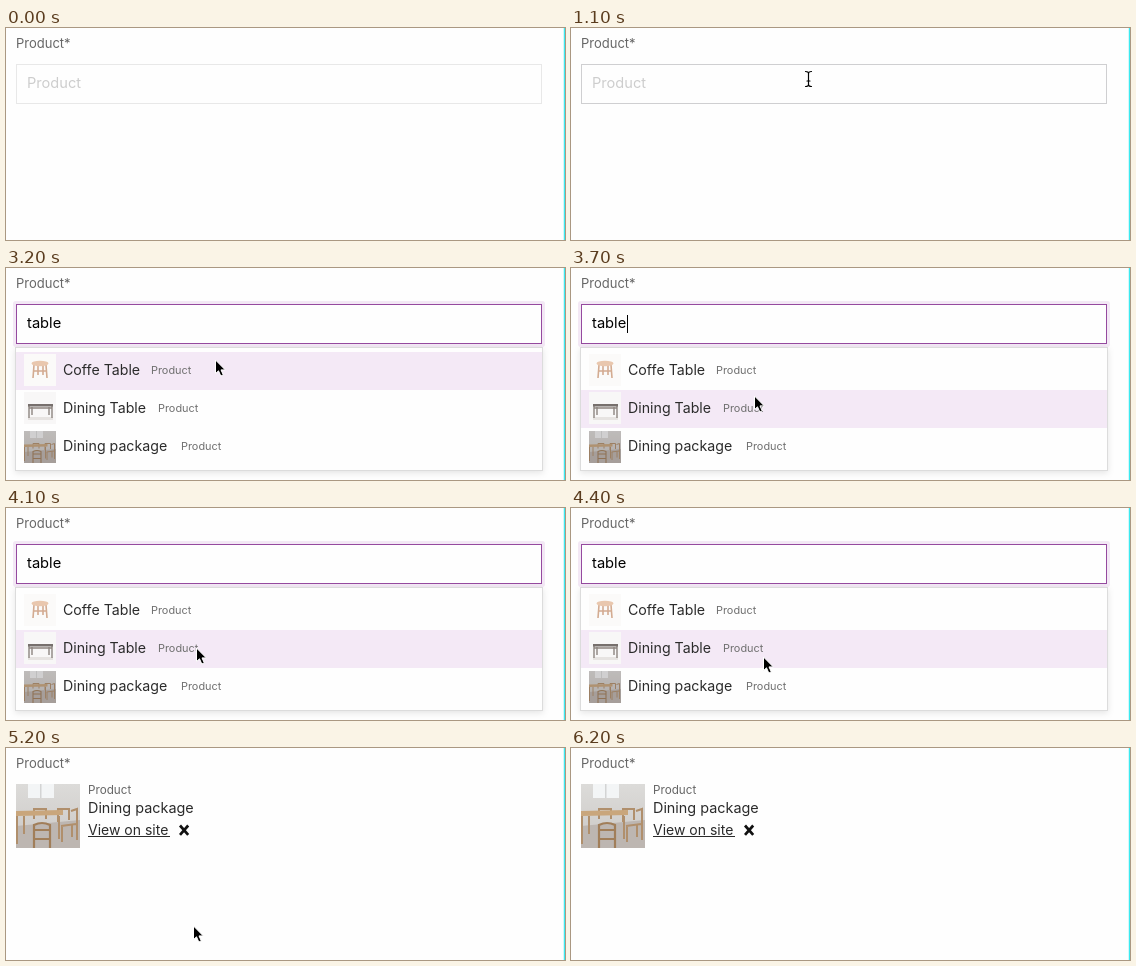
An HTML page for the animation above (7.9 s loop, 559 px wide and 212 px high).

```html
<!DOCTYPE html>
<html lang="en">
<head>
<meta charset="utf-8">
<title>Product chooser</title>
<style>
  html, body { margin: 0; width: 100%; height: 100%; overflow: hidden; background: #fefefe; }
  svg { display: block; }
  text { font: 14.2px Inter, "Open Sans", sans-serif; fill: #2b2b2b; }
  .label { font-size: 13px; fill: #666; }
  .hint { font-size: 14.6px; fill: #cdcdcd; }
  .typed { font-size: 14.7px; fill: #000; }
  .kind { font-size: 10.9px; fill: #707070; }
  .meta { font-size: 11.7px; fill: #666; }
  .name { font-size: 14.4px; }
  .link { font-size: 14px; }
  #panel { fill: #fefefe; stroke: #dcdcdc; filter: drop-shadow(0 2px 3px rgba(0, 0, 0, .1)); }
</style>
</head>
<body>
<svg width="559" height="212" viewBox="0 0 559 212">
  <defs>
    <linearGradient id="wall" x2="0" y2="1">
      <stop offset="0" stop-color="#dcdbd9"/>
      <stop offset="1" stop-color="#cbc8c5"/>
    </linearGradient>
    <symbol id="room" viewBox="0 0 64 64">
      <path fill="url(#wall)" d="M0 0H64V64H0Z"/>
      <path fill="#bdb6b1" d="M0 42L64 36V64H0Z"/>
      <path fill="#f3f5f6" d="M12 0H38V14H12Z"/>
      <path fill="#d3d4d4" d="M24 0H25.5V14H24Z"/>
      <g fill="none" stroke="#b08f6c" stroke-width="2">
        <path d="M18 35V25H30V35M42 38V25H53V36M55 27L61 25V56M45 42L60 40M46 42V58M56 41V53"/>
        <path d="M1 32V60M43 32V55M8 32V50"/>
      </g>
      <path fill="#c9a67c" d="M0 27L47 26V31L0 32Z"/>
      <g fill="none" stroke="#a17e59" stroke-width="2.2">
        <path d="M18 64V41Q26 37 34 41V64M18 46H34M18 55H34"/>
      </g>
    </symbol>
    <symbol id="coffee" viewBox="0 0 32 32">
      <path fill="#fbfaf9" d="M0 0H32V32H0Z"/>
      <path fill="none" stroke="#d3ab91" stroke-width="1.6" d="M10 11L9 24M22 11L23 24M14 11V21M19 11V21M10 17H22"/>
      <ellipse cx="16" cy="9.5" rx="8.5" ry="2.7" fill="#e9c7ae"/>
    </symbol>
    <symbol id="dining" viewBox="0 0 32 32">
      <path fill="#f8f7f7" d="M0 0H32V32H0Z"/>
      <path fill="#e6e3e1" d="M4 25H29V28H4Z"/>
      <path fill="none" stroke="#8d8580" stroke-width="1.4" d="M5 13V26M28 13V26M8 15V23M25 15V23M5 16H28"/>
      <path fill="#77706d" d="M4 12H29V14.5H4Z"/>
    </symbol>
  </defs>

  <path fill="#d2f8fa" d="M557 0h1v212h-1z"/>
  <path fill="#3ceaf0" d="M558 0h1v212h-1z"/>
  <text class="label" x="10" y="20">Product*</text>

  <g id="form">
    <rect id="ring" x="7" y="33" width="532" height="46" rx="3" fill="#f3e8f5"/>
    <rect id="field" x="10.5" y="36.5" width="525" height="39" fill="#fefefe"/>
    <text id="hint" class="hint" x="21" y="60">Product</text>
    <text id="typed" class="typed" x="21" y="60"></text>
    <rect id="caret" y="47" width="1" height="18"/>
    <rect id="panel" x="9.5" y="79.5" width="527"/>
    <g id="list">
      <rect id="mark" x="10" width="526" height="38" fill="#f4e9f6"/>
      <use href="#coffee" x="18" y="86" width="32" height="32"/>
      <text x="57" y="107">Coffe Table</text>
      <text class="kind" x="145" y="106">Product</text>
      <use href="#dining" x="18" y="124" width="32" height="32"/>
      <text x="57" y="145">Dining Table</text>
      <text class="kind" x="152" y="144">Product</text>
      <use href="#room" x="18" y="163" width="32" height="32"/>
      <path fill="#51484a" opacity=".22" d="M18 163h32v32h-32z"/>
      <text x="57" y="183">Dining package</text>
      <text class="kind" x="175" y="182">Product</text>
    </g>
  </g>

  <g id="chosen">
    <use href="#room" x="10" y="36" width="64" height="64"/>
    <text class="meta" x="82" y="46">Product</text>
    <text class="name" x="82" y="65">Dining package</text>
    <text class="link" x="82" y="87">View on site</text>
    <path fill="#2b2b2b" d="M82 88h82v1h-82z"/>
    <path stroke="#111" stroke-width="2.7" d="M174 77.5L182.2 86.8M182.2 77.5L174 86.8"/>
  </g>

  <path id="arrow" stroke="#fff" stroke-width="1" stroke-linejoin="round"
    d="M0 0V13.6L3 10.8L5.3 16L7.8 14.9L5.5 9.9H9.8Z"/>
  <g id="beam" fill="none" stroke-linecap="round">
    <path stroke="#fff" stroke-width="2.6" d="M-3 -7.5Q0 -7.5 0 -5.5Q0 -7.5 3 -7.5M0 -5.5V5.5M-3 7.5Q0 7.5 0 5.5Q0 7.5 3 7.5M-1.5 2H1.5"/>
    <path stroke="#000" stroke-width="1.2" d="M-3 -7.5Q0 -7.5 0 -5.5Q0 -7.5 3 -7.5M0 -5.5V5.5M-3 7.5Q0 7.5 0 5.5Q0 7.5 3 7.5M-1.5 2H1.5"/>
  </g>
</svg>
<script>
  const LOOP = 7900, STEP = 100;
  const $ = id => document.getElementById(id);
  const show = (id, on) => $(id).style.display = on ? '' : 'none';
  const set = (id, attrs) => {
    for (const key in attrs) $(id).setAttribute(key, attrs[key]);
  };
  const within = (t, from, to) => t >= from && t < to;

  // Key times, typed text and caret position
  const typing = [
    [0, '', 21], [1700, 't', 27], [2000, 'ta', 35],
    [2300, 'tab', 44], [2400, 'tabl', 48], [2600, 'table', 56]
  ];

  // Pointer legs: time, x, y
  const legs = [
    [[400, 299, 144], [500, 287, 112], [600, 263, 70], [700, 248, 48],
     [900, 248, 48], [1000, 240, 50], [1100, 237, 51], [1300, 236, 55], [1700, 236, 55]],
    [[3000, 228, 60], [3200, 209, 92], [3500, 187, 124], [3700, 183, 128],
     [4100, 190, 140], [4400, 192, 149], [4600, 189, 169], [4900, 187, 176],
     [5200, 187, 178], [5800, 187, 178], [6100, 192, 190], [6200, 192, 190]]
  ];

  function pointerAt(t) {
    const leg = legs.find(l => within(t, l[0][0], l[l.length - 1][0]));
    if (!leg) return null;
    const i = leg.findIndex(p => p[0] > t);
    const [a, b] = [leg[i - 1], leg[i]];
    const k = (t - a[0]) / (b[0] - a[0]);
    return { x: Math.round(a[1] + (b[1] - a[1]) * k), y: Math.round(a[2] + (b[2] - a[2]) * k) };
  }

  function render(t) {
    const done = t >= 5100;
    const focused = within(t, 1200, 4700);
    const [since, word, caretX] = typing.filter(k => k[0] <= t).pop();
    const pointer = pointerAt(t);

    show('form', !done);
    show('chosen', done);

    const glow = Math.min((t - 1100) / 200, (4900 - t) / 300);
    set('ring', { opacity: Math.max(0, Math.min(1, glow)) });
    set('field', { stroke: focused ? '#954a9f' : t < 1000 ? '#e8e8e8' : t < 1200 ? '#cfcfd1' : '#c8c8ce' });
    show('hint', !word);
    $('typed').textContent = word;
    const blinkOn = !word || Math.floor((t - since) / 500) % 2 === 0;
    show('caret', focused && blinkOn);
    set('caret', { x: caretX });

    const open = t >= 2400;
    show('panel', t >= 2300);
    set('panel', { height: open ? 123 : 5 });
    show('list', open);
    const row = pointer ? Math.floor((pointer.y - 84) / 38) : -1;
    show('mark', row >= 0 && row < 3);
    set('mark', { y: 84 + row * 38 });

    const overField = pointer && !done && within(pointer.y, 36, 76);
    const overText = within(t, 4800, 5100);
    const beam = overField || overText;
    show('beam', pointer && beam);
    show('arrow', pointer && !beam);
    if (pointer) {
      set(beam ? 'beam' : 'arrow', { transform: `translate(${pointer.x + .5} ${pointer.y})` });
    }
  }

  const start = performance.now();
  function tick() {
    const t = (performance.now() - start) % LOOP;
    render(Math.floor(t / STEP) * STEP);
    requestAnimationFrame(tick);
  }
  tick();
</script>
</body>
</html>
```
